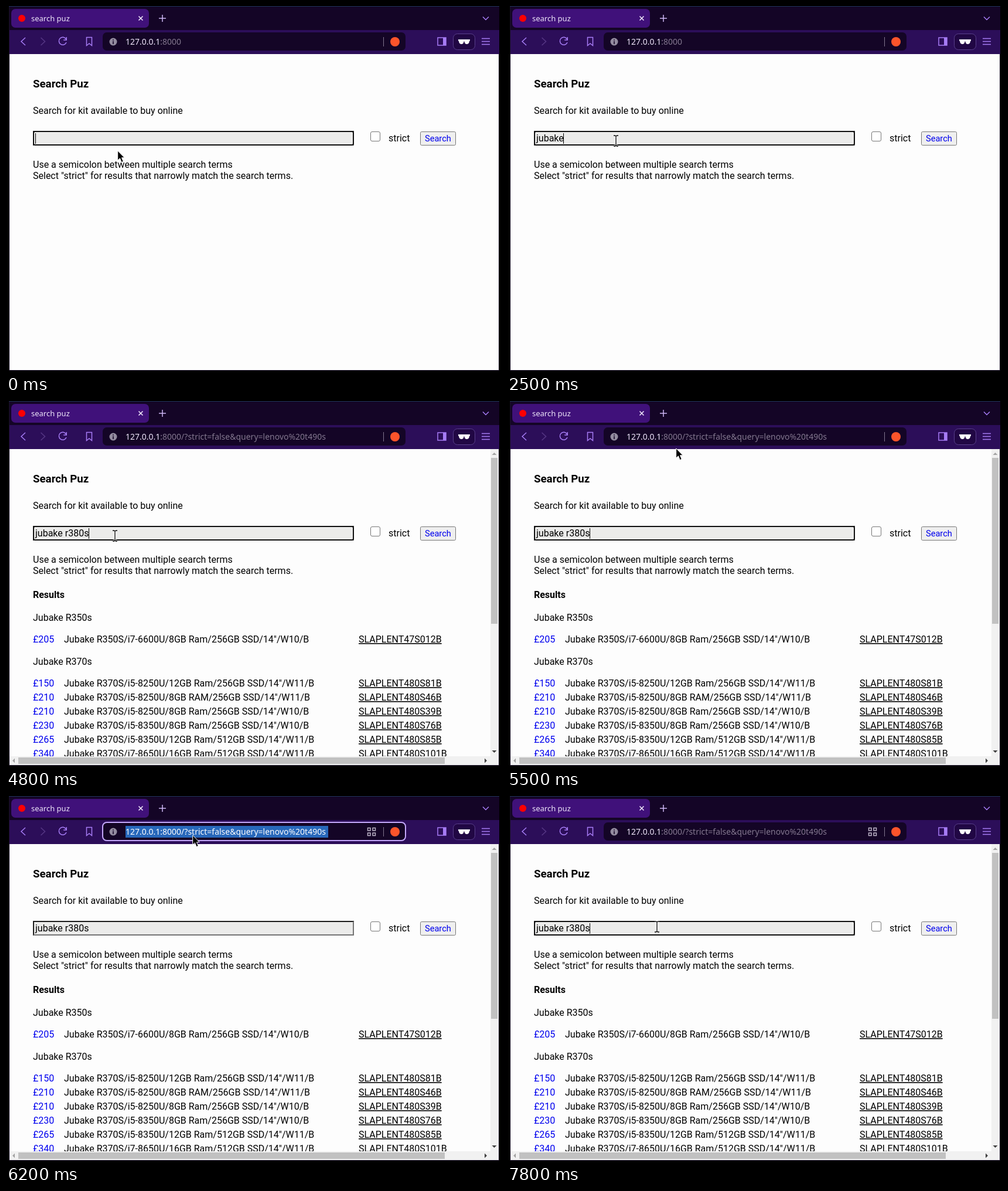
An HTML page for the animation above (8 s loop, 845 px wide and 626 px high).

```html
<!DOCTYPE html>
<html lang="en">
<head>
<meta charset="utf-8">
<title>Search demo</title>
<style>
  html, body { margin: 0; width: 100%; height: 100%; overflow: hidden; background: #000; }
  svg { display: block; width: 845px; height: 626px; }
  text { font: 16px Roboto, sans-serif; fill: #000; white-space: pre; }
  .ui { font-family: "Noto Sans", "Open Sans", sans-serif; }
  .line { fill: none; stroke: #a67cf5; stroke-width: 1.5; }
  .bold { font-weight: 700; }
  .price { fill: #00e; }
  .code { text-decoration: underline; }
</style>
</head>
<body>
<svg viewBox="0 0 845 626">
  <defs><clipPath id="view"><rect x="6" y="82" width="821" height="524"/></clipPath></defs>

  <rect width="845" height="626" fill="#000"/>
  <rect x="5" width="837" height="622" fill="#1b1328"/>
  <rect x="6" width="836" height="41" fill="#140526"/>
  <rect x="5" width="837" height="1" fill="#1d3553"/>
  <rect x="6" y="41" width="836" height="41" fill="#2c0e59"/>
  <rect x="6" y="82" width="835" height="539" fill="#fdfdfd"/>

  <!-- tab strip -->
  <rect x="9" y="5" width="235" height="32" rx="7" fill="#40117a"/>
  <circle cx="27" cy="21" r="6" fill="#f00"/>
  <text class="ui" x="43" y="26" style="font-size:13px;fill:#eee6fa">search puz</text>
  <path d="M226.500 17.500l7 7m0-7l-7 7" fill="none" stroke="#eee6fa" stroke-width="1.600"/>
  <path d="M261 21h12M267 15v12" fill="none" stroke="#cdb8f5" stroke-width="1.500"/>
  <path class="line" d="M814 18.500l5 5 5-5"/>

  <!-- toolbar -->
  <path class="line" d="M33 54l-7 6.500 7 6.500"/>
  <path class="line" d="M59.500 54l7 6.500-7 6.500" style="stroke:#563785"/>
  <path class="line" d="M102.500 56.500A6.500 6.500 0 1 0 103 62M103.200 53v5h-5"/>
  <path class="line" d="M137.500 53.500h9v14l-4.500-3.500-4.500 3.500z"/>
  <rect id="bar" x="165" y="45" width="517" height="31" rx="7"/>
  <circle cx="183" cy="61" r="6.500" fill="#938b9f"/>
  <path d="M183 57v1.800M183 60v5" stroke="#140526" stroke-width="1.600"/>
  <rect id="selection" x="204" y="51" width="346" height="20" fill="#2868bb"/>
  <text class="ui" x="204" y="66" style="font-size:14px"><tspan id="host">127.0.0.1</tspan><tspan id="path"></tspan></text>
  <g id="grid" fill="none" stroke="#bdb5c8" stroke-width="1.500">
    <path d="M617.500 54.500h4.500v4.500h-4.500zM626 54.500h4.500v4.500h-4.500zM617.500 63h4.500v4.500h-4.500zM626 63h4.500v4.500h-4.500z"/>
  </g>
  <rect x="644" y="53" width="1" height="16" fill="#82768f"/>
  <circle cx="664" cy="61" r="8" fill="#fb542b"/>
  <rect class="line" x="737" y="54" width="14" height="13"/>
  <rect x="746" y="54" width="5" height="13" fill="#a67cf5"/>
  <rect x="763.500" y="47.500" width="37" height="27" rx="7" fill="#210744" stroke="#59408b"/>
  <path d="M772 57h20v2l-1 1q-.5 5-4.500 5-3.500 0-4-4.500h-1q-.5 4.500-4 4.500-4 0-4.500-5l-1-1z" fill="#fff"/>
  <path class="line" d="M812 55.500h14M812 60.500h14M812 65.500h14"/>

  <!-- page -->
  <text class="bold" x="46" y="139" style="font-size:18.720px">Search Puz</text>
  <text x="46" y="184">Search for kit available to buy online</text>
  <g id="field">
    <rect x="46" y="213" width="548" height="25" fill="#ebebea"/>
    <path d="M47 238V214H594" fill="none" stroke="#1c1c1c" stroke-width="2"/>
    <path d="M47 237H593V214" fill="none" stroke="#747474" stroke-width="2"/>
  </g>
  <rect id="ring" x="47" y="214" width="546" height="23" rx="2.500" fill="#ebebea" stroke="#101010" stroke-width="2"/>
  <text id="typed" x="50" y="231"></text>
  <rect id="caret" y="217" width="1" height="18"/>
  <rect x="622.500" y="214.500" width="16" height="16" rx="2.500" fill="#fff" stroke="#767676"/>
  <text x="653" y="231">strict</text>
  <rect x="707.500" y="214.500" width="60" height="23" rx="2" fill="#efefef" stroke="#767676"/>
  <text class="price" x="715" y="231" style="font-size:14.600px">Search</text>
  <text x="46" y="276">Use a semicolon between multiple search terms</text>
  <text x="46" y="295">Select "strict" for results that narrowly match the search terms.</text>

  <g id="results">
    <g id="rows" clip-path="url(#view)"></g>
    <path d="M827 82h14v539H6v-15h821z" fill="#f1f1f1"/>
    <path d="M828 97h11v283h-11zM21 608h728v11H21z" fill="#c1c1c1"/>
    <path d="M829.500 92l4-4 4 4zM15 609.500v8l-4-4z" fill="#a3a3a3"/>
    <path d="M829.500 596l4 4 4-4zM817 609.500v8l4-4z" fill="#404040"/>
  </g>

  <!-- pointers -->
  <path id="arrow" d="M.7.9V17.200L4.500 13.800 7.200 20.600 10.300 19.300 7.500 12.800H12.300Z" fill="#000" stroke="#fff"/>
  <g id="beam" fill="none">
    <path d="M-4-9h2.500L0-8 1.500-9H4M-4 9h2.500L0 8 1.500 9H4M0-8V8" stroke="#fff" stroke-width="3"/>
    <path d="M-4-9h2.500L0-8 1.500-9H4M-4 9h2.500L0 8 1.500 9H4M0-8V8" stroke="#000" stroke-width="1.300"/>
  </g>
</svg>

<script>
const LOOP = 8000, STEP = 100;
const QUERY = "jubake r380s";
const KEY_TIMES = [1400, 1500, 1600, 1800, 2100, 2500, 2700, 3100, 3800, 3900, 4100, 4300];
const CARET_OFF = [[500, 1100], [3700, 3800], [4900, 5500], [6100, 7600]];
const LOADED = 4800, URL_FOCUS = 6200, FIELD_FOCUS = 7600;

// time, x, y, pointer shape
const POINTER = [
  [0, 190, 246, "arrow"], [300, 186, 240, "arrow"],
  [700, 186, 238, "arrow"], [800, 186, 233, "beam"], [900, 186, 230, "beam"],
  [5200, 190, 222, "beam"], [5300, 214, 180, "arrow"], [5400, 252, 128, "arrow"],
  [5500, 288, 80, "arrow"], [5600, 306, 52, "beam"],
  [5800, 312, 61, "beam"], [5900, 318, 67, "beam"], [6200, 318, 66, "arrow"],
  [6900, 315, 82, "arrow"], [7000, 305, 125, "arrow"], [7100, 290, 165, "arrow"],
  [7200, 276, 196, "arrow"], [7300, 261, 218, "beam"], [7400, 256, 223, "beam"]
];

const ITEMS = [
  ["£150", "i5-8250U/12GB Ram/256GB SSD/14\"/W11/B", "81B"],
  ["£210", "i5-8250U/8GB RAM/256GB SSD/14\"/W11/B", "46B"],
  ["£210", "i5-8250U/8GB Ram/256GB SSD/14\"/W10/B", "39B"],
  ["£230", "i5-8350U/8GB Ram/256GB SSD/14\"/W10/B", "76B"],
  ["£265", "i5-8350U/12GB Ram/512GB SSD/14\"/W11/B", "85B"],
  ["£340", "i7-8650U/16GB Ram/512GB SSD/14\"/W11/B", "101B"]
];

const $ = id => document.getElementById(id);
const within = (t, from, to) => t >= from && t < to;
const show = (id, on) => $(id).setAttribute("visibility", on ? "visible" : "hidden");

function setAttrs(el, attrs) {
  for (const key in attrs) el.setAttribute(key, attrs[key]);
}

function addText(x, y, content, className = "") {
  const el = document.createElementNS("http://www.w3.org/2000/svg", "text");
  setAttrs(el, { x, y, class: className });
  el.textContent = content;
  $("rows").append(el);
}

function addRow(y, price, description, code) {
  addText(46, y, price, "price");
  addText(99, y, description);
  addText(602, y, code, "code");
}

function buildResults() {
  addText(46, 336, "Results", "bold");
  addText(46, 375, "Jubake R350s");
  addRow(412, "£205", "Jubake R350S/i7-6600U/8GB Ram/256GB SSD/14\"/W10/B", "SLAPLENT47S012B");
  addText(46, 450, "Jubake R370s");
  ITEMS.forEach(([price, spec, suffix], i) =>
    addRow(487 + 24 * i, price, "Jubake R370S/" + spec, "SLAPLENT480S" + suffix));
}

function drawAddressBar(t) {
  const focused = within(t, URL_FOCUS, FIELD_FOCUS);
  const hovered = within(t, 5600, URL_FOCUS);
  setAttrs($("bar"), {
    fill: hovered ? "#180830" : "#140526",
    stroke: focused ? "#c4a8fb" : "none",
    "stroke-width": 2
  });
  $("path").textContent = ":8000" + (t >= LOADED ? "/?strict=false&query=lenovo%20t490s" : "");
  $("host").style.fill = focused ? "#fff" : "#eee6fa";
  $("path").style.fill = focused ? "#fff" : "#83788f";
  show("selection", focused);
  show("grid", t >= URL_FOCUS);
}

function drawField(t) {
  const typed = $("typed");
  typed.textContent = QUERY.slice(0, KEY_TIMES.filter(time => time <= t).length);
  const width = typed.textContent ? typed.getComputedTextLength() : 0;
  $("caret").setAttribute("x", Math.floor(50 + width));
  show("caret", !CARET_OFF.some(([from, to]) => within(t, from, to)));
  show("ring", !within(t, URL_FOCUS, FIELD_FOCUS));
}

function drawPointer(t) {
  const [, x, y, shape] = POINTER.filter(([time]) => time <= t).pop();
  for (const id of ["arrow", "beam"]) show(id, id === shape);
  $(shape).setAttribute("transform", `translate(${x} ${y})`);
}

function render(now) {
  const t = Math.floor((now % LOOP) / STEP) * STEP;
  drawAddressBar(t);
  drawField(t);
  drawPointer(t);
  show("results", t >= LOADED);
}

buildResults();
const start = performance.now();
function tick() {
  render(performance.now() - start);
  requestAnimationFrame(tick);
}
tick();
</script>
</body>
</html>
```
